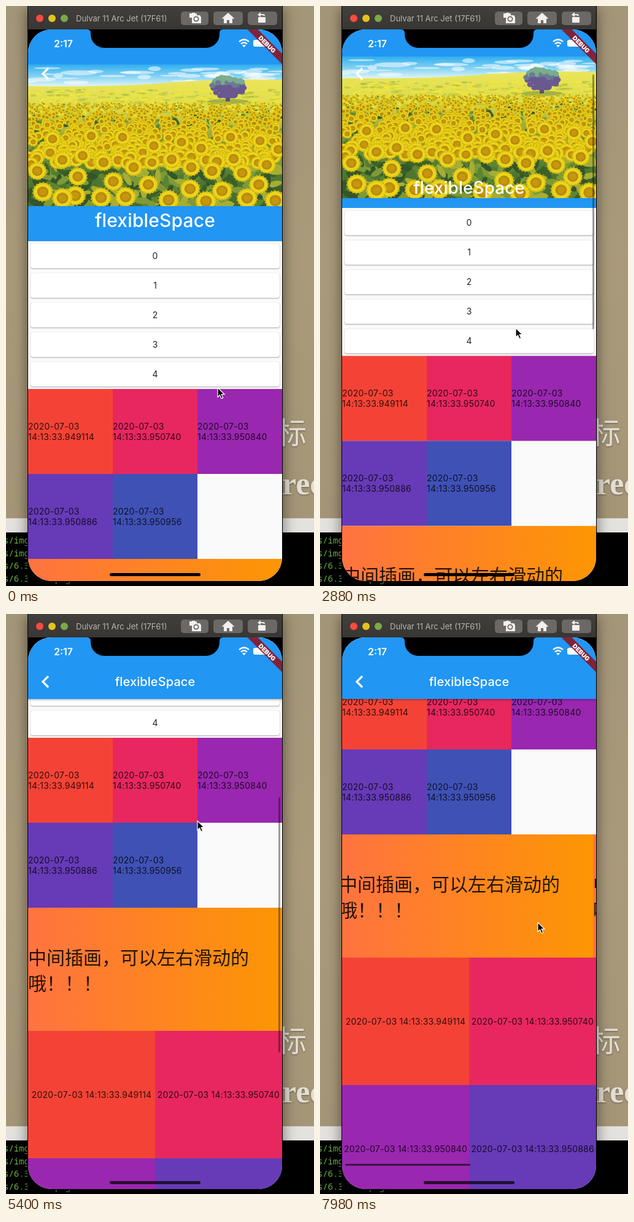
An HTML page with a canvas that plays this animation: 502 by 942 pixels, repeating every 8000 ms.

```html
<!DOCTYPE html>
<html lang="en">
<head>
<meta charset="utf-8">
<style>
html, body { margin: 0; width: 100%; height: 100%; overflow: hidden; background: #000; }
#stage { position: relative; width: 502px; height: 942px; overflow: hidden; font: 14px/17px Inter, sans-serif; color: #000; }
#stage div, #stage svg, canvas { position: absolute; box-sizing: border-box; white-space: nowrap; }
#desk { width: 502px; height: 832px; background: linear-gradient(#a49679, #aa9a7b 50%, #a59678); }
#strip { top: 832px; width: 502px; height: 23px; background: #e4e2df; }
#terminal { top: 855px; width: 502px; height: 87px; background: #000; }
#terminal div { left: -4px; font: 14px/20px "Noto Sans Mono", monospace; color: #74b84a; }
.mark { color: #e4dfd6; text-shadow: 0 1px 3px #6c604a; }
#device { left: 35px; width: 416px; height: 935px; background: #000; box-shadow: 0 4px 22px rgba(0,0,0,.5); }
#bar { left: 1px; width: 414px; height: 38px; background: linear-gradient(#423f3c, #383633); }
#bar .light { top: 14px; width: 12px; height: 12px; border-radius: 50%; }
#bar .button { top: 9px; height: 22px; background: #6b6865; border-radius: 5px; }
#caption { left: 78px; top: 11px; font-size: 13px; line-height: 18px; color: #b8b5b1; }
#screen { left: 36px; top: 38px; width: 414px; height: 896px; border-radius: 38px; overflow: hidden; background: #fafafa; }
#list { top: 344px; width: 414px; }
.card { left: 4px; width: 406px; height: 40px; line-height: 40px; text-align: center; background: #fff; border-radius: 4px; color: #222;
  box-shadow: 0 1px 2px rgba(0,0,0,.32), 0 0 1px rgba(0,0,0,.2); }
.cell { display: flex; align-items: center; justify-content: center; letter-spacing: .2px; color: rgba(0,0,0,.8); }
#pager { top: 516px; width: 414px; height: 200px; overflow: hidden; }
.page { width: 414px; height: 200px; padding-top: 58px; background: linear-gradient(90deg, #ff7340, #fd9603);
  font: 30px/42px "Noto Sans CJK SC", "Noto Sans CJK", sans-serif; color: rgba(0,0,0,.85); }
#header { width: 414px; overflow: hidden; background: #2196f3; }
#title { width: 414px; height: 24px; text-align: center; font-size: 20px; line-height: 24px; letter-spacing: .1px; font-weight: 500;
  color: #fff; transform-origin: 50% 100%; }
#clock { left: 42px; top: 13px; font-size: 16px; line-height: 20px; font-weight: 600; color: #fff; }
#debug { left: 374px; top: 28px; width: 80px; height: 12px; transform-origin: 40px -28px; transform: rotate(45deg);
  background: rgba(140,20,35,.88); color: #fff; font-size: 10px; line-height: 12px; font-weight: 900; text-align: center; }
#thumb { left: 408px; width: 3px; height: 414px; border-radius: 2px; background: rgba(0,0,0,.38); }
#pageThumb { top: 855px; width: 204px; height: 3px; border-radius: 2px; background: rgba(0,0,0,.6); }
#home { left: 133px; top: 883px; width: 148px; height: 5px; border-radius: 3px; background: #000; }
</style>
</head>
<body>
<div id="stage">
  <div id="desk"></div><div id="strip"></div>
  <div id="terminal"></div>
  <div class="mark" style="left:441px;top:655px;font:500 49px/70px 'Noto Sans CJK SC','Noto Sans CJK',sans-serif">标</div>
  <div class="mark" style="left:450px;top:746px;font:bold 52px/60px 'Liberation Serif',serif">rec</div>
  <div id="device">
    <div id="bar">
      <div class="light" style="left:13px;background:#fa4b40"></div>
      <div class="light" style="left:33px;background:#e6c21d"></div>
      <div class="light" style="left:53px;background:#7da94a"></div>
      <div id="caption">Dulvar 11 Arc Jet (17F61)</div>
      <div class="button" style="left:249px;width:45px"></div>
      <div class="button" style="left:302px;width:48px"></div>
      <div class="button" style="left:358px;width:48px"></div>
      <svg width="414" height="38" fill="#f2f0ee">
        <path d="M263 12h4v-1h5v1h3v3h5l2 3v10h-15v-9h-4z"/><circle cx="274" cy="21" r="4.500" fill="#6b6865"/><circle cx="274" cy="21" r="2.800"/>
        <path d="M316 20l10-9 10 9-1 1-2-1v8h-5v-5h-4v5h-5v-8l-2 1z"/>
        <path d="M375 18h12v9h-12zM374 14l5-4v3h4q3 0 3 3h-2q0-1-2-1h-3v3z"/>
      </svg>
    </div>
  </div>
  <div id="screen">
    <div id="list"><div id="pager"></div></div>
    <div id="header">
      <canvas id="field" width="414" height="230"></canvas>
      <div id="title">flexibleSpace</div>
      <svg width="50" height="100"><path d="M33 63l-9 9 9 9" fill="none" stroke="#fff" stroke-width="3.2"/></svg>
    </div>
    <svg width="414" height="50">
      <path d="M96 0q6 0 6 6v2a22 22 0 0 0 22 22h166a22 22 0 0 0 22-22v-2q0-6 6-6z"/>
      <g fill="none" stroke="#fff" stroke-width="2.2"><path d="M344 20q8-7 16 0M347 23.500q5-4.500 10 0"/></g>
      <path d="M349 26q3-2 6 0l-3 3z" fill="#fff"/>
      <rect x="367" y="17" width="23" height="11" rx="3" fill="#fff"/><rect x="391" y="20.500" width="2" height="4" rx="1" fill="#fff"/>
    </svg>
    <div id="clock">2:17</div>
    <div id="debug">DEBUG</div>
    <div id="thumb"></div><div id="pageThumb"></div><div id="home"></div>
  </div>
  <svg id="cursor" width="16" height="22"><path d="M1 1v15l3.500-3.300 2.500 5.800 2.700-1.100-2.500-5.700h4.900z" fill="#000" stroke="#fff" stroke-width="1.200"/></svg>
</div>
<script>
const $ = id => document.getElementById(id);

function add(parent, className, text, style) {
  const el = document.createElement('div');
  el.className = className;
  el.innerHTML = text;
  Object.assign(el.style, style);
  parent.append(el);
  return el;
}

['s/img', 's/img', 's/6.3.1', 's/6.3.1 2.png'].forEach((text, i) =>
  add($('terminal'), '', text, { top: 3 + i * 20.6 + 'px' }));

// Scrolling content
const colors = ['#f44336', '#e8275f', '#9a27b0', '#673ab7', '#3f51b5'];
const micros = [949114, 950740, 950840, 950886, 950956];

function grid(top, columns, size, separator) {
  colors.forEach((background, i) => add($('list'), 'cell', `<span>2020-07-03${separator}14:13:33.${micros[i]}</span>`, {
    left: i % columns * size + 'px', top: top + Math.floor(i / columns) * size + 'px',
    width: size + 'px', height: size + 'px', background,
    justifyContent: columns === 3 ? 'flex-start' : 'center'
  }));
}

for (let i = 0; i < 5; i++) add($('list'), 'card', i, { top: i * 48 + 4 + 'px' });
grid(240, 3, 138, '<br>');
grid(716, 2, 207, ' ');
const pages = [0, 1].map(() => add($('pager'), 'page', '中间插画，可以左右滑动的<br>哦！！！'));

// Sunflower field
const g = $('field').getContext('2d');
let seed = 7;
const random = () => (seed = seed * 16807 % 2147483647) / 2147483647;

function gradient(y0, y1, ...stops) {
  const fill = g.createLinearGradient(0, y0, 0, y1);
  stops.forEach((color, i) => fill.addColorStop(i / (stops.length - 1), color));
  return fill;
}

function ellipse(x, y, rx, ry, fill, turn = 0) {
  g.fillStyle = fill;
  g.beginPath();
  g.ellipse(x, y, rx, ry, turn, 0, 7);
  g.fill();
}

function star(x, y, r, turn, fill) {
  g.fillStyle = fill;
  g.beginPath();
  for (let i = 0; i < 36; i++) {
    const a = i * Math.PI / 18 + turn, d = i % 2 ? r * .82 : r;
    g.lineTo(x + d * Math.cos(a), y + d * Math.sin(a) * .95);
  }
  g.fill();
}

function flower(x, y, r) {
  const turn = random();
  star(x, y, r, turn, '#d3b80f');
  star(x, y, r * .9, turn + .17, '#ecd41c');
  ellipse(x, y, r * .52, r * .49, '#b58c0b');
  if (r > 7) ellipse(x, y, r * .34, r * .32, '#c7960f');
}

function paintField() {
  g.fillStyle = gradient(0, 36, '#31aef0', '#7ed0f3', '#e4f6f5');
  g.fillRect(0, 0, 414, 40);
  for (let i = 0; i < 45; i++)
    ellipse(random() * 414, 6 + random() * 24, 8 + random() * 22, 1 + random() * 3, 'rgba(255,255,255,.55)');
  g.fillStyle = gradient(24, 230, '#ece65a', '#d9d84a', '#8b9c34', '#527a31', '#456a2b');
  g.beginPath();
  g.moveTo(0, 35);
  g.quadraticCurveTo(120, 37, 210, 31);
  g.quadraticCurveTo(310, 22, 414, 25);
  g.lineTo(414, 230);
  g.lineTo(0, 230);
  g.fill();
  for (let i = 0; i < 450; i++)
    ellipse(random() * 414, 40 + random() * 45, 2 + random() * 7, 1 + random(), i % 3 ? 'rgba(244,232,60,.6)' : 'rgba(150,180,60,.4)');

  ellipse(326, 60, 34, 4, '#9fb34a');
  g.fillStyle = '#60506e';
  g.fillRect(322, 46, 7, 14);
  for (let i = 0; i < 160; i++) {
    const a = random() * 7, d = Math.sqrt(random()), y = 36 + 17 * d * Math.sin(a);
    ellipse(326 + 26 * d * Math.cos(a), y, 5, 4, y < 29 ? '#79ad8d' : y < 36 ? '#6e7996' : '#69598f');
  }

  // Leaves, then ever larger flowers towards the viewer
  const greens = ['#3b6128', '#5c8433', '#7d9a37', '#a5ad35', '#34552a'];
  for (let i = 0; i < 420; i++) {
    const y = 85 + random() * 145;
    ellipse(random() * 414, y, 3 + y * .05, 2 + y * .015, greens[i % 5], random() * 3);
  }
  for (let y = 62; y < 160; y += 1.5) {
    const r = 2 + (y - 62) * .125;
    for (let x = random() * r * 6; x < 414; x += r * (2.5 + random() * 7)) {
      if (random() < .4) ellipse(x + r, y + r, r, r * .4, greens[Math.floor(random() * 4)]);
      flower(x, y + random() * 3, r * (.85 + random() * .3));
    }
  }
  const front = [40,121, 103,116, 154,118, 205,132, 250,126, 330,118, 378,124, 408,138, 89,148, 282,136, 234,154, 123,159,
    335,153, 389,163, 56,155, 15,173, 172,167, 266,167, 300,173, 349,176, 81,182, 139,190, 24,207, 196,195,
    264,202, 316,205, 376,195, 77,213, 119,216, 159,215, 229,220, 357,217, 56,217, 290,222, 403,221];
  for (let i = 0; i < front.length; i += 2) flower(front[i], front[i + 1], 14 + (front[i + 1] - 115) * .042);
}
paintField();

// Smooth curve through [time, value] keys
function curve(keys) {
  const slope = i => i < 1 || i > keys.length - 2 || (keys[i + 1][1] - keys[i][1]) * (keys[i][1] - keys[i - 1][1]) <= 0
    ? 0 : (keys[i + 1][1] - keys[i - 1][1]) / (keys[i + 1][0] - keys[i - 1][0]);
  return t => {
    if (t >= keys[keys.length - 1][0]) return keys[keys.length - 1][1];
    const i = keys.findIndex((k, n) => t < keys[n + 1][0]);
    const [t0, v0] = keys[i], [t1, v1] = keys[i + 1], d = t1 - t0, u = (t - t0) / d;
    const ease = u * u * (3 - 2 * u);
    const linear = (v1 - v0) / d;
    const bend = u * (1 - u) * (slope(i) * (1 - u) - slope(i + 1) * u);
    return v0 + linear * d * ease + d * bend;
  };
}

const scrollAt = curve([[0, 0], [1300, 0], [1500, -1], [1900, 0], [2880, 53.6], [3600, 214], [4920, 340], [5940, 511], [6600, 540]]);
const cursorX = curve([[0, 344], [1500, 300], [2880, 318], [3600, 268], [4920, 317], [5940, 304], [7980, 354]]);
const cursorY = curve([[0, 619], [1500, 578], [2880, 522], [3600, 337], [4920, 335], [5940, 350], [7980, 500]]);
const pageAt = curve([[0, 0], [7740, 0], [7980, 5]]);
const clamp = v => Math.min(1, Math.max(0, v));

function draw(t) {
  const scroll = scrollAt(t), collapsed = clamp(scroll / 244), height = 344 - 244 * collapsed;
  $('list').style.transform = `translateY(${-scroll}px)`;
  $('header').style.height = height + 'px';
  $('header').style.boxShadow = collapsed > .8 ? '0 1px 4px rgba(0,0,0,.35)' : 'none';
  $('field').style.top = 57 - 61 * collapsed + 'px';
  $('field').style.opacity = 1 - clamp((collapsed * 244 - 188) / 56);
  $('title').style.top = height - 40 + 'px';
  $('title').style.transform = `scale(${1.5 - .5 * collapsed})`;

  $('thumb').style.top = 46 + scroll * .509 + 'px';
  $('thumb').style.opacity = Math.min(clamp((t - 1300) / 150), clamp((7250 - t) / 250));
  const page = pageAt(t);
  pages.forEach((el, i) => el.style.left = i * 414 - Math.round(page) + 'px');
  $('pageThumb').style.left = 3 + page * .49 + 'px';
  $('pageThumb').style.opacity = clamp((t - 7740) / 150);
  $('home').style.opacity = 1 - .3 * clamp((scroll - 100) / 100);
  $('cursor').style.transform = `translate(${Math.round(cursorX(t))}px, ${Math.round(cursorY(t))}px)`;
}

const start = performance.now();
function tick() {
  draw((performance.now() - start) % 8000);
  requestAnimationFrame(tick);
}
tick();
</script>
</body>
</html>
```
